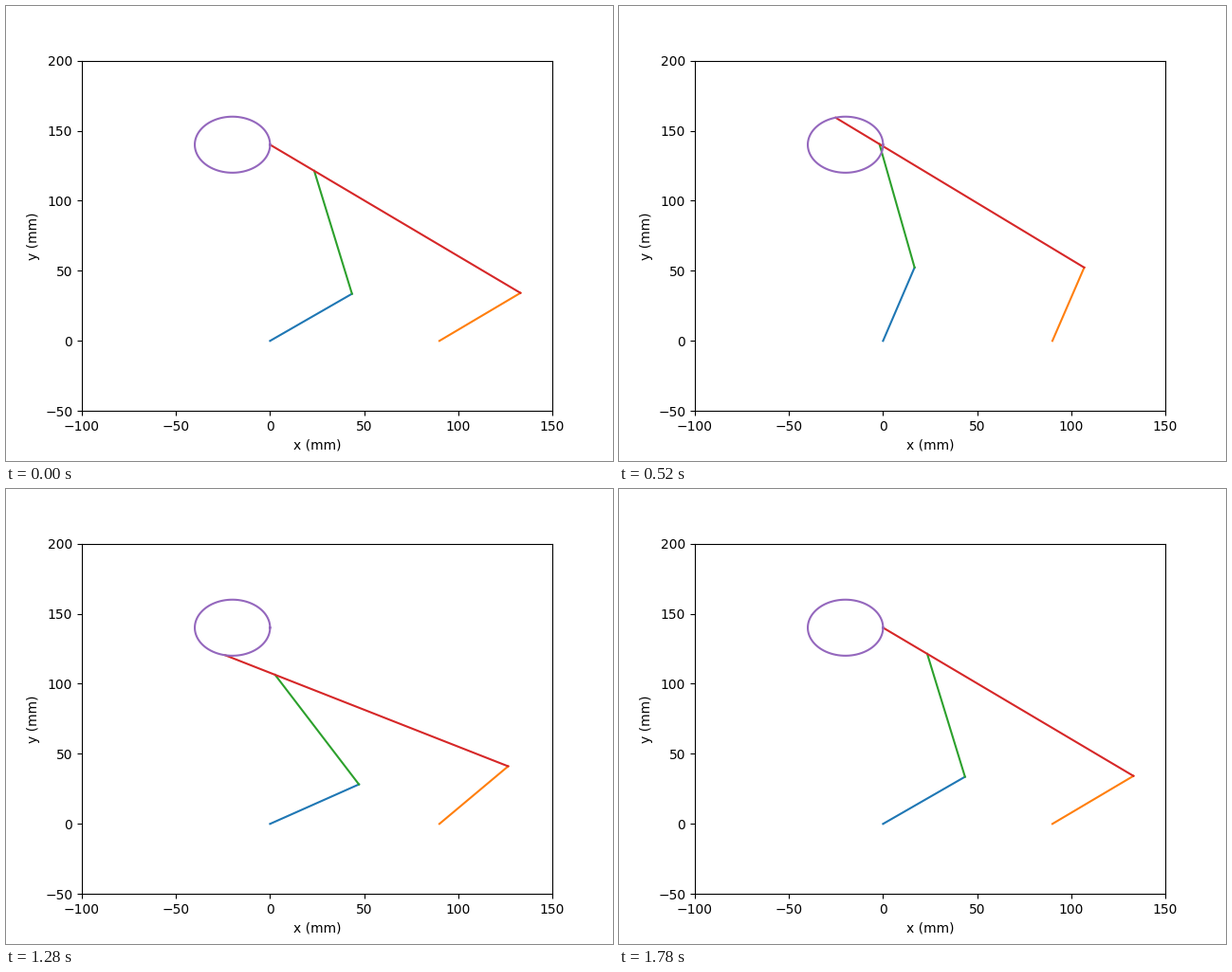
Write a matplotlib script that moves like this. It is 640 by 480 pixels and loops after 1800 ms.

```python
import numpy as np
import matplotlib.pyplot as plt
from matplotlib.animation import FuncAnimation

FRAMES = 90
CRANK, COUPLER, ARM, TIP = 55, 90, 170, 30  # link lengths in mm
LEFT, RIGHT = np.array([0.0, 0.0]), np.array([90.0, 0.0])

theta = np.linspace(0, 2 * np.pi, FRAMES)
path = np.column_stack([-20 + 20 * np.cos(theta), 140 + 20 * np.sin(theta)])


def elbow(base, end, r1, r2):
    """Right-hand joint of two links r1, r2 reaching from base to end."""
    d = np.hypot(*(end - base))
    u = (end - base) / d
    a = (r1**2 - r2**2 + d**2) / (2 * d)
    h = np.sqrt(r1**2 - a**2)
    return base + a * u + h * np.array([u[1], -u[0]])


def solve(tip):
    right = elbow(RIGHT, tip, CRANK, ARM)
    joint = tip + (right - tip) * TIP / ARM
    left = elbow(LEFT, joint, CRANK, COUPLER)
    return (LEFT, left), (RIGHT, right), (left, joint), (right, tip)


fig, ax = plt.subplots(figsize=(6.4, 4.8), dpi=100)
ax.set(xlim=(-100, 150), ylim=(-50, 200), xlabel="x (mm)", ylabel="y (mm)")
links = [ax.plot([], [], color=f"C{i}", lw=1.5)[0] for i in range(4)]
ax.plot(path[:, 0], path[:, 1], color="C4", lw=1.5)


def update(i):
    for line, ends in zip(links, solve(path[i])):
        line.set_data(*np.transpose(ends))
    return links


anim = FuncAnimation(fig, update, frames=FRAMES, interval=20,
                     repeat=True, repeat_delay=0)
plt.show()
```
